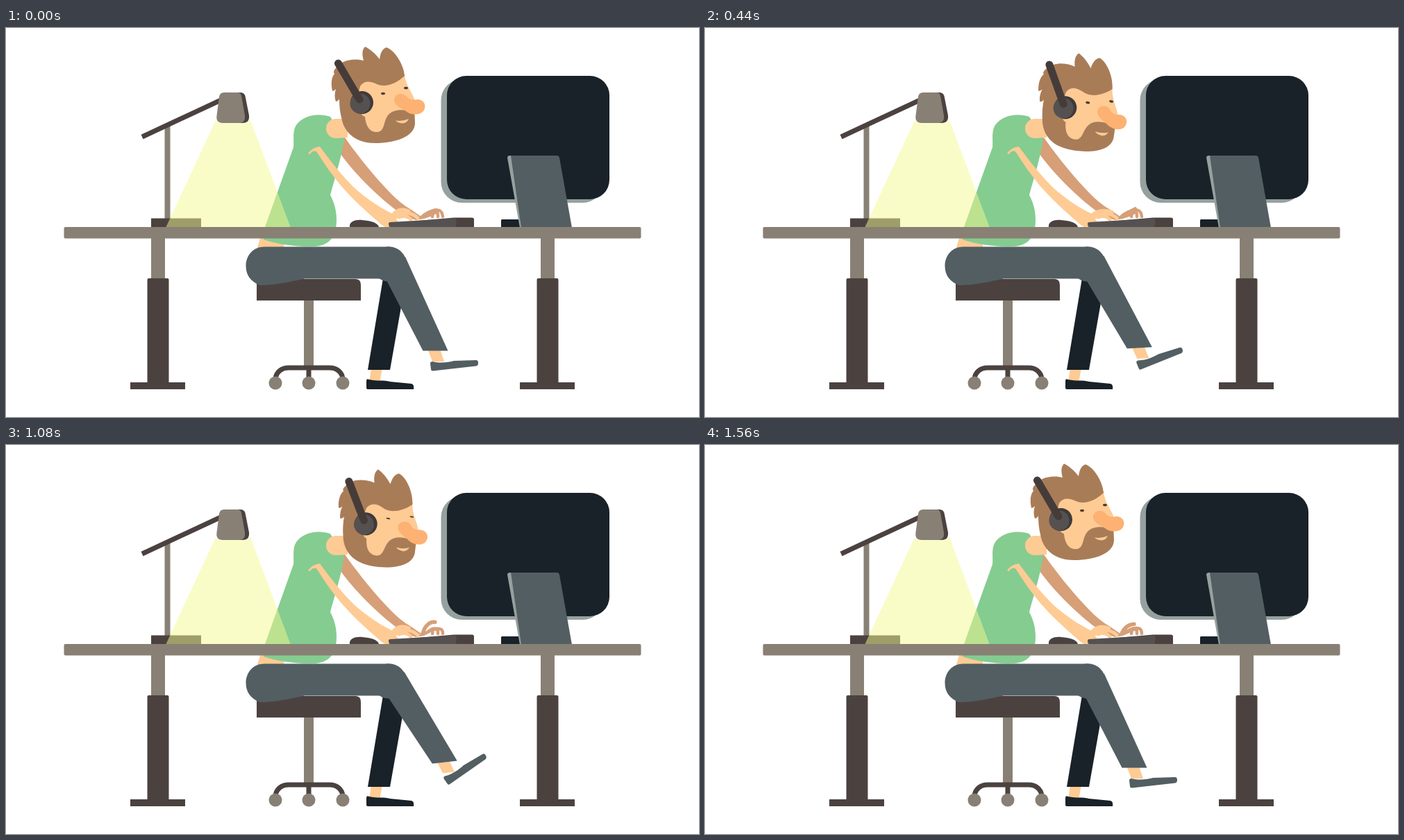
Write an HTML page that moves like this. It is 998 by 561 pixels and loops after 1600 ms.

```html
<!DOCTYPE html>
<html lang="en">
<head>
<meta charset="utf-8">
<title>Working at a desk</title>
<style>
  html, body { margin: 0; height: 100%; overflow: hidden; background: #fff; }
  svg { display: block; width: 100vw; height: 100vh; }
  .taupe { fill: #888074; }
  .brown { fill: #4b4240; }
  .slate { fill: #535e62; }
  .navy { fill: #192129; }
  .mist { fill: #95a19e; }
  .skin { fill: #fecb94; }
  .tan { fill: #d69f78; }
  .hair { fill: #a97c58; }
  .line { fill: none; stroke-linecap: round; stroke-linejoin: round; }
</style>
</head>
<body>
<svg viewBox="0 0 998 561">
  <defs>
    <g id="deskLeg">
      <path class="taupe" d="M209 300h20v64h-20z"/>
      <rect class="brown" x="203.5" y="361" width="31" height="156" rx="2"/>
      <path class="brown" d="M179 511h79v10h-79z"/>
    </g>
  </defs>

  <!-- lamp -->
  <path class="taupe" d="M228.500 140h8v138h-8z"/>
  <path d="M196 157L318 100" stroke="#4b4240" stroke-width="7"/>
  <path class="brown" d="M316 93H337Q343 93 344.500 98L350 126Q351 137 341 137H318Z"/>
  <path class="taupe" d="M307 99Q308 93 314 93H333Q338 93 339 98L344 126Q345 137 336 137H312Q302 137 303.500 126Z"/>
  <path class="brown" d="M209 274.500h72V288h-72z"/>

  <!-- monitor -->
  <rect class="mist" x="626.500" y="74" width="234" height="178" rx="30"/>
  <rect class="navy" x="635" y="69" width="234" height="178" rx="28"/>
  <path class="navy" d="M714 276H745V288H713V277Z"/>
  <path class="mist" d="M722 187Q722 184 726 184H735L750 288H740Z"/>
  <path class="slate" d="M727 184H794Q796 184 797 187L815 288H742Z"/>

  <!-- chair -->
  <path class="taupe" d="M429 390h14v98h-14z"/>
  <path class="line" stroke="#4b4240" stroke-width="7" d="M388 506C389 496 397 490 407 490H466C476 490 484 496 485 506M436 490V506"/>
  <g class="taupe">
    <circle cx="388" cy="512" r="9.500"/><circle cx="436" cy="512" r="9.500"/><circle cx="485" cy="512" r="9.500"/>
  </g>
  <path class="brown" d="M361 362H503Q511 362 511 371V393H361Z"/>

  <!-- far leg -->
  <path class="skin" d="M526 490H542L538 512H523Z"/>
  <path class="navy" d="M544 355L521 493H553L571 391L577 357Z"/>
  <path class="navy" d="M519 509Q519 505 523 507C535 510 544 507 553 510L584 513Q588 514 587 521H521Q519 521 519 519Z"/>

  <!-- far arm -->
  <path class="tan" d="M482 154L488 158C507 185 529 212 547 231C557 242 568 253 582 261L598 272L590 277L572 270C543 250 505 214 482 182Z"/>
  <path id="farPalm" class="tan"/>
  <g class="line" stroke="#d69f78">
    <path id="farFingers" stroke-width="4.500"/>
    <path id="farIndex" stroke-width="5.500"/>
  </g>

  <!-- torso -->
  <path class="skin" d="M367 300L361 320H400V300Z"/>
  <path fill="#85cc91" d="M371 305L373 287L414 172C415 163 412 149 418 140C428 126 449 122 467 128L487 159C485 180 474 215 467 241C474 254 478 270 475 289C472 305 462 314 445 315C420 316 390 312 371 305Z"/>
  <path fill="#f3f990" opacity=".5" d="M302 133L306 137H345L352 133L410 288H230Z"/>

  <!-- near arm -->
  <path class="skin" d="M435 181Q441 172 452 171C466 190 482 211 501 230C519 246 538 259 557 268L565 280L554 287Q547 289 541 284C518 264 492 241 474 217C463 203 455 190 447 178Q441 176 438 182Z"/>
  <g class="line" stroke="#fecb94">
    <path id="nearPalm" stroke-width="9"/>
    <path id="nearFingers" stroke-width="5"/>
    <path id="nearIndex" stroke-width="5"/>
  </g>

  <!-- keyboard and mouse -->
  <path class="brown" d="M495 287C494 279 503 276 513 277C524 278 535 280 537 287Z"/>
  <path class="brown" d="M594 278L645 273.500H671Q674 273.500 674 276V288H594Z"/>
  <path fill="#565151" d="M551 282Q551 280 554 280L647 274.500Q650 278 647 288H554Q551 287 551 282Z"/>

  <!-- desk -->
  <use href="#deskLeg"/>
  <use href="#deskLeg" x="561"/>
  <rect class="taupe" x="83.500" y="287" width="831" height="16.500" rx="2"/>

  <!-- near leg -->
  <g id="calf">
    <path class="skin" d="M606 460H624L631 481H614Z"/>
    <path id="shoe" class="slate" d="M611 484Q611 481 614 481C627 484 637 482 645 480L677 479Q680 479 680 483Q680 487 677 487.500L615 494.500Q612 495 612 492Z"/>
    <path class="slate" d="M552 340L575 330L636.500 465.500H600.500L546 360Z"/>
  </g>
  <circle class="slate" cx="551.500" cy="340.500" r="25.200"/>
  <path class="slate" d="M372 315.500H552V361.500H430C405 367 385 371 366 371C352 366 345.500 356 345.500 343C345.500 328 356 315.500 372 315.500Z"/>

  <!-- head -->
  <path class="skin" d="M475 131H492V158L475 159A14 14 0 0 1 475 131Z"/>
  <g id="head">
    <path class="skin" d="M505 66H574C575 84 588 96 589 106V135L560 156H515L505 130Z"/>
    <path class="hair" d="M510 84C516 75 525 77 532 80C545 87 561 81 574 69C573 53 560 32 548 28C541 30 539 38 538 45C532 37 524 30 517 27C512 32 513 40 515 47C505 44 490 46 484 50C474 57 470 63 473 66C468 72 468 82 470 91Q473 91 475 88Q472 98 475 106Q479 105 480 102C480 113 481 121 483 129C486 148 500 166 532 166C560 166 589 157 589 137L588 122C575 117 558 116 550 126C543 135 546 149 535 150C523 151 518 140 517 128C508 126 504 105 510 84Z"/>
    <path class="skin" d="M561 133.500Q571 135 580 131Q577 137.500 571 137.500Q564 137 561 133.500Z"/>
    <path fill="#fdb172" d="M559 105C558 94 572 92 577 99C581 104 586 104 592 103C603 103 606 113 601 120C596 126 583 126 576 120C569 115 561 113 559 105Z"/>
    <g fill="#493c37">
      <ellipse class="eye" cx="543" cy="94.500" rx="3"/>
      <ellipse class="eye" cx="576" cy="86.500" rx="3"/>
    </g>
    <circle cx="512.500" cy="107.500" r="16.500" fill="#3f3a3a"/>
    <circle cx="510" cy="109" r="14.500" fill="#565151"/>
    <path class="line" stroke="#453c3a" stroke-width="11" d="M478.500 51L509 103"/>
  </g>
</svg>
<script>
const LOOP = 1600, STEP = 40;
const $ = id => document.getElementById(id);
const eyes = document.querySelectorAll('.eye');

const ease = (t, from, to) => {
  const x = Math.min(1, Math.max(0, (t - from) / (to - from)));
  return (1 - Math.cos(Math.PI * x)) / 2;
};
const wave = (t, period) => Math.cos(2 * Math.PI * t / period);
const turn = (id, angle, x, y) => $(id).setAttribute('transform', `rotate(${angle} ${x} ${y})`);
const shape = (id, d) => $(id).setAttribute('d', d);

function typeNear(t) {
  const curl = Math.max(0, wave(t, LOOP / 3)) ** 2;
  shape('nearPalm', 'M547 279L562 270L573 269');
  shape('nearFingers', `M566 269Q581 ${265 - curl * 2} 593 274M566 273Q576 269 583 276`);
  shape('nearIndex', `M557 270Q${570 - curl * 5} ${260 - curl * 2} ${588 - curl * 8} ${266 - curl * 2}`);
}

function typeFar(t) {
  const swing = wave(t - LOOP / 16, LOOP / 4);
  const point = Math.max(0, swing), lift = Math.max(0, -swing);
  const top = 260 - point * 4 + lift * 5;
  shape('farPalm', `M590 277L606 ${265 + lift * 3}L${620 - lift * 4} ${top}L626 ${264 + lift * 2}L614 ${271 - lift * 2}L602 275Z`);
  shape('farFingers', `M612 266Q${627 + lift * 3} ${257 + lift * 5} 629 272M612 266Q623 262 622 272M609 268Q616 266 614 272`);
  shape('farIndex', `M600 272Q${607 - lift * 2} ${266 - lift * 12} 618 ${263 - lift * 8}`);
}

function draw(t) {
  const nod = ease(t, 40, 630) - ease(t, 875, 1405);
  const kick = ease(t, 40, 900) - ease(t, 900, 1540);
  const blink = ease(t, 880, 1240) - ease(t, 1260, 1420);
  turn('head', 14 * nod, 477, 145);
  turn('calf', -7.7 * kick, 551.5, 340.5);
  turn('shoe', -27.2 * kick, 627, 477);
  eyes.forEach(eye => eye.setAttribute('ry', 1.8 - 1.4 * blink));
  typeNear(t);
  typeFar(t);
}

function tick() {
  draw(Math.floor(performance.now() % LOOP / STEP) * STEP);
  requestAnimationFrame(tick);
}
tick();
</script>
</body>
</html>
```
